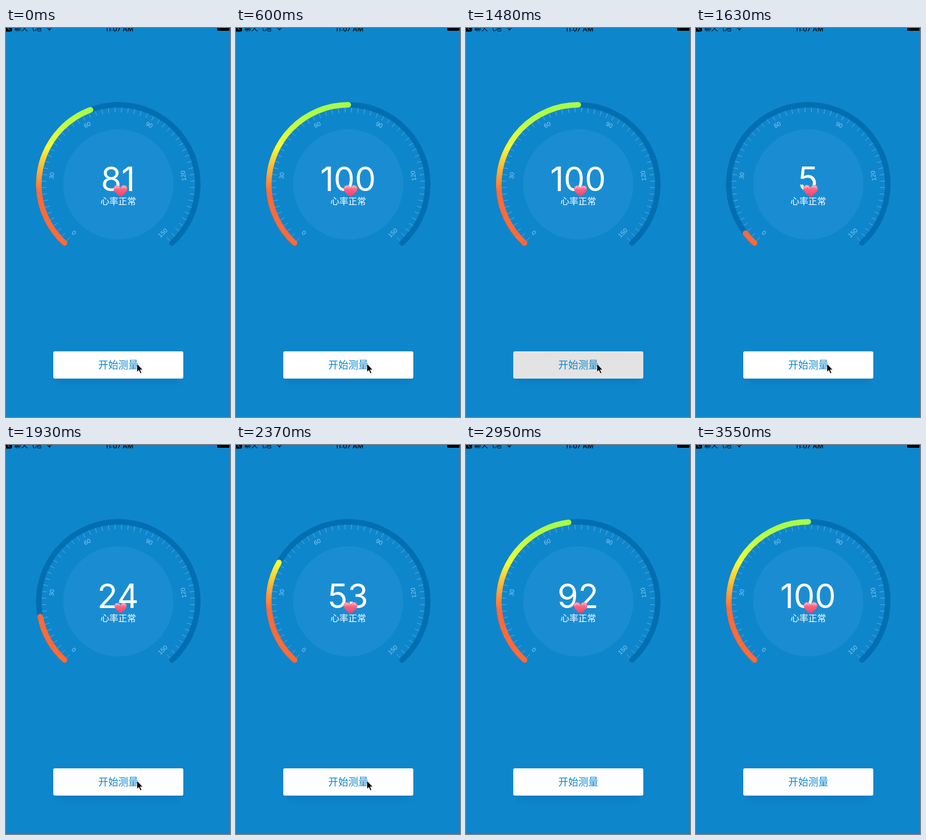
Write an HTML page that moves like this. It is 403 px wide and 699 px high and loops after 3.65 s.

```html
<!DOCTYPE html>
<html lang="zh">
<head>
<meta charset="utf-8">
<title>心率</title>
<style>
  html, body { margin: 0; width: 100%; height: 100%; overflow: hidden; background: #0e86cc; }
  svg { display: block; width: 403px; height: 699px; }
  text { text-anchor: middle; font-family: Inter, "Noto Sans CJK SC", "Noto Sans CJK", sans-serif; }
  .cjk { font-family: "Noto Sans CJK SC", "Noto Sans CJK", sans-serif; font-weight: 350; }
  .scale { font: 11px "Liberation Sans", sans-serif; fill: #8ccbef; }
  .ring { fill: none; stroke-width: 10; stroke-linecap: round; }
</style>
</head>
<body>
<svg viewBox="0 0 403 699">
  <defs>
    <linearGradient id="heat" gradientUnits="userSpaceOnUse" x1="0" y1="296" x2="0" y2="146">
      <stop offset="0" stop-color="#ff6a38"/>
      <stop offset=".2" stop-color="#ff9f36"/>
      <stop offset=".38" stop-color="#fdcc36"/>
      <stop offset=".55" stop-color="#f3fa3a"/>
      <stop offset=".78" stop-color="#cbfc41"/>
      <stop offset="1" stop-color="#a8fb48"/>
    </linearGradient>
    <linearGradient id="pink" x1="0" y1="0" x2="0" y2="1">
      <stop offset="0" stop-color="#ff9cae"/>
      <stop offset=".4" stop-color="#fb5f80"/>
      <stop offset="1" stop-color="#fb3f68"/>
    </linearGradient>
    <filter id="blur" x="-20%" y="-50%" width="140%" height="200%"><feGaussianBlur stdDeviation="4"/></filter>
  </defs>

  <!-- status bar -->
  <g>
    <rect x="-3" y="-8" width="14" height="14.5" rx="3"/>
    <path d="M6.5 -3L3.5 0.5L6.5 4" fill="none" stroke="#0e86cc" stroke-width="1.3"/>
    <text class="cjk" x="39.5" y="5" font-size="12.3">聊天气泡</text>
    <path d="M73.5 0Q78 -4 82.5 0L81.3 1.3Q78 -1.4 74.7 1.3ZM75.6 2.2Q78 .2 80.4 2.2L78 4.8Z"/>
    <text x="204" y="6" font-size="12" font-weight="500">11:07 AM</text>
    <rect x="380" y="-5" width="22" height="10" rx="1.5"/>
  </g>

  <circle cx="202" cy="281" r="99" fill="#1a8dd2"/>
  <path id="track" class="ring" stroke="#006fb1"/>
  <path id="progress" class="ring" stroke="url(#heat)" pathLength="1"/>
  <g id="dial"></g>

  <text id="count" x="201.5" y="293" font-size="60" fill="#fff"></text>
  <text class="cjk" x="202" y="316.5" font-size="16" fill="#fff">心率正常</text>
  <g id="heart">
    <path fill="url(#pink)" d="M0 11C-4 7.5 -13 2 -13 -4.5C-13 -12 -3.5 -13.5 0 -6.5C3.5 -13.5 13 -12 13 -4.5C13 2 4 7.5 0 11Z"/>
    <path d="M-10.5 -5C-10 -9 -5 -9.5 -3 -6M3.5 -7C5 -9.5 9.5 -9 10.3 -5.5" fill="none" stroke="#ffd0d8" stroke-width="1.6" stroke-linecap="round" opacity=".65"/>
  </g>

  <rect x="91" y="594" width="222" height="44" rx="4" fill="#00508c" opacity=".16" filter="url(#blur)"/>
  <rect id="button" x="85" y="581" width="234" height="49" rx="3"/>
  <text class="cjk" x="202" y="611.7" font-size="18" fill="#0e86cc">开始测量</text>
  <path id="cursor" d="M0 0V15.2L3.5 12L6.1 18L8.6 16.9L6 11.2H10.6Z" stroke="#fff" stroke-width=".9"/>
</svg>

<script>
const CENTER = { x: 202, y: 281 };
const SWEEP = 275, START = -SWEEP / 2;
const LOOP = 3650;
const TIMES = [0, 150, 300, 450, 600, 740, 890, 1040, 1190, 1330, 1480, 1630, 1780,
  1930, 2070, 2220, 2370, 2510, 2660, 2810, 2950, 3100, 3250, 3400, 3550];
const COUNTS = [5, 15, 24, 34, 43, 53, 62, 72, 81, 92, 100];
const HEART_WIDTHS = [24.5, 22, 23, 26];
const PRESS = 10, RESTART = 11;

const $ = id => document.getElementById(id);

// Angles are in degrees clockwise from the top of the dial.
function polar(radius, degrees) {
  const a = degrees * Math.PI / 180;
  return [CENTER.x + radius * Math.sin(a), CENTER.y - radius * Math.cos(a)].map(v => v.toFixed(2));
}

// Labels lie along the dial, turned so that they read upwards on both sides.
function labelTilt(angle) {
  if (angle > 60) return angle - 180;
  return angle < -90 ? angle + 180 : angle;
}

const arc = `M${polar(143, START)}A143 143 0 1 1 ${polar(143, -START)}`;
$("track").setAttribute("d", arc);
$("progress").setAttribute("d", arc);

let dial = "";
for (let i = 0; i <= 55; i++) {
  const angle = START + i * 5;
  dial += `<path d="M${polar(129.5, angle)}L${polar(138, angle)}" stroke="#62b4e2" stroke-width=".9"/>`;
  if (i % 11 === 0) {
    const [x, y] = polar(119.5, angle);
    dial += `<text class="scale" transform="translate(${x} ${y}) rotate(${labelTilt(angle)})" y="2.5">${i / 11 * 30}</text>`;
  }
}
$("dial").innerHTML = dial;

function cursorAt(step) {
  if (step < 18) return [235.5, 603];
  if (step === 18) return [245.5, 611.5];
  return [316.5, 647.5];
}

function draw(time) {
  const step = TIMES.findLastIndex(t => t <= time);
  const run = step < RESTART ? step + 8 : step - RESTART;
  const level = Math.min(1, 0.07 + 0.0977 * run);

  $("progress").setAttribute("stroke-dasharray", `${level / 2} 2`);
  $("count").textContent = COUNTS[Math.min(run, COUNTS.length - 1)];
  $("heart").setAttribute("transform", `translate(206 293) scale(${HEART_WIDTHS[step % 4] / 26})`);
  $("button").setAttribute("fill", step === PRESS ? "#e3e3e3" : "#fff");

  // The pointer leaves once the run is nearly done, and is back at the start of the loop.
  $("cursor").setAttribute("visibility", step < 20 ? "visible" : "hidden");
  $("cursor").setAttribute("transform", `translate(${step === 0 ? cursorAt(0) : cursorAt(step)})`);
}

const begin = performance.now();
function tick() {
  draw((performance.now() - begin) % LOOP);
  requestAnimationFrame(tick);
}
tick();
</script>
</body>
</html>
```
